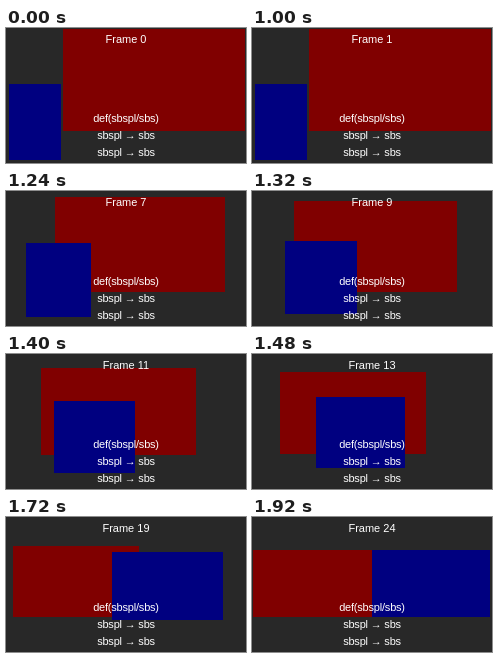
An HTML page that plays this animation: 240 px wide and 135 px high, repeating every 2.92 s.

```html
<!DOCTYPE html>
<html lang="en">
<meta charset="utf-8">
<title>Side-by-side layout transition</title>
<style>
  html, body { margin: 0; width: 100%; height: 100%; overflow: hidden; background: #282828; }
  svg { display: block; width: 100%; height: 100%; }
  text { font: 11px "Liberation Sans", Arial, sans-serif; fill: #fff; text-anchor: middle; }
  .caption { letter-spacing: -0.2px; }
</style>
<svg viewBox="0 0 240 135">
  <rect width="240" height="135" fill="#282828"/>
  <rect id="red" fill="#800000"/>
  <rect id="blue" fill="#000080"/>
  <text id="label" x="120" y="15"></text>
  <text class="caption" x="120" y="94">def(sbspl/sbs)</text>
  <text class="caption" x="120" y="111">sbspl → sbs</text>
  <text class="caption" x="120" y="128">sbspl → sbs</text>
</svg>
<script>
  const HOLD = 1000, STEP = 40, LAST = 24, LOOP = 2920;
  const byId = id => document.getElementById(id);
  const ease = t => (1 - Math.cos(Math.PI * t)) / 2;
  const mix = (a, b, t) => a + (b - a) * t;

  // Each box is left, top, width, height.
  const panels = [
    { node: byId("red"), from: [57, 1, 182, 102], to: [1, 33, 119, 67] },
    { node: byId("blue"), from: [3, 56, 52, 76], to: [120, 33, 118, 67] },
  ];

  // The centre starts one step after the size; both arrive together on whole pixels.
  function place({ node, from, to }, move, grow) {
    [["x", "width"], ["y", "height"]].forEach(([edge, extent], i) => {
      const centre = mix(from[i] + from[i + 2] / 2, to[i] + to[i + 2] / 2, move);
      const size = Math.round(mix(from[i + 2], to[i + 2], grow));
      node.setAttribute(edge, Math.floor(centre - size / 2));
      node.setAttribute(extent, size);
    });
  }

  function draw(time) {
    const t = time % LOOP;
    const count = t < HOLD ? 0 : Math.min(LAST, 1 + Math.floor((t - HOLD) / STEP));
    const move = ease(Math.max(0, count - 1) / (LAST - 1));
    const grow = ease(count / LAST);
    panels.forEach(panel => place(panel, move, grow));
    byId("label").textContent = "Frame " + count;
  }

  const start = performance.now();
  function tick() {
    draw(performance.now() - start);
    requestAnimationFrame(tick);
  }
  tick();
</script>
</html>
```
